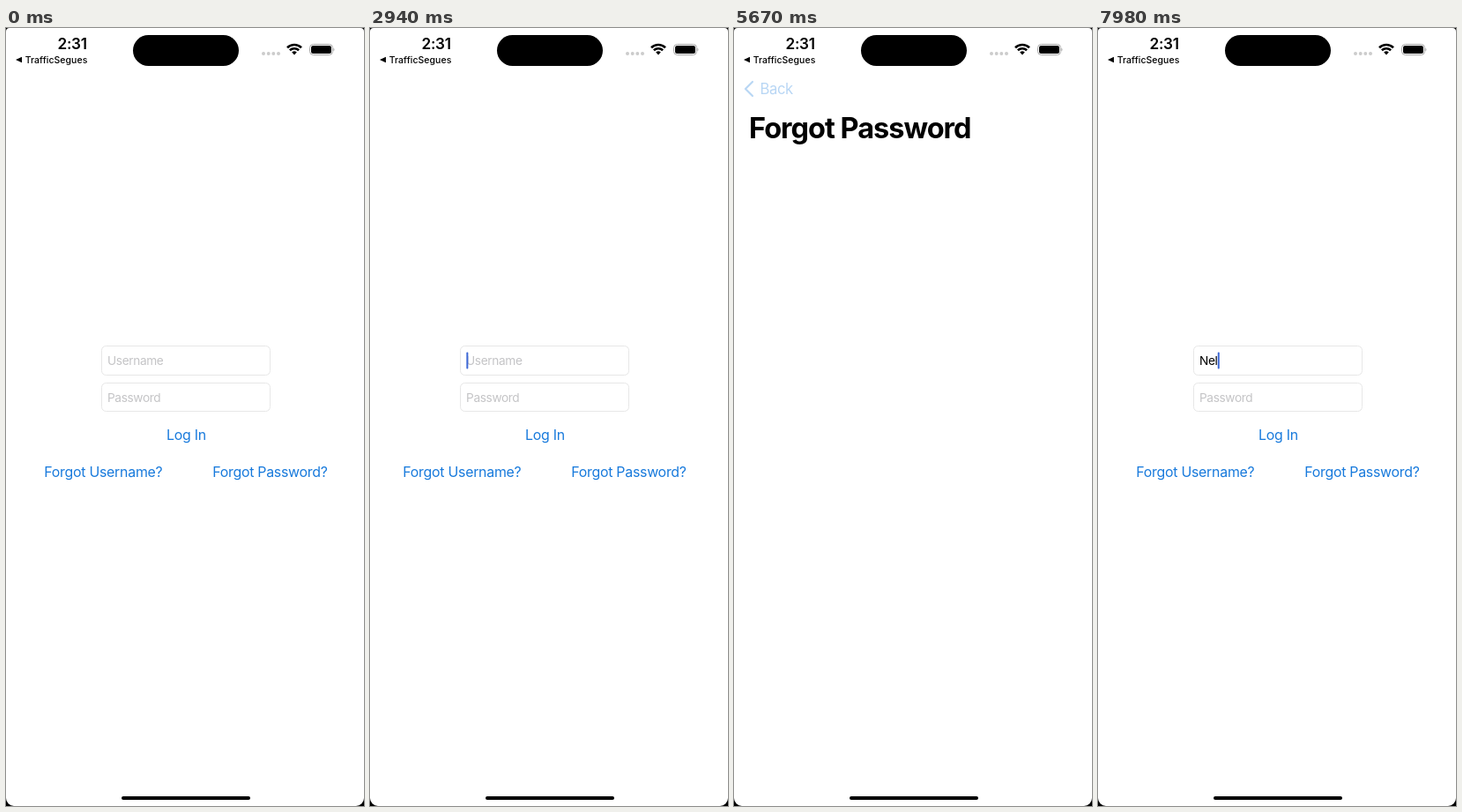
An HTML page that plays this animation: 406x882 px, repeating every 8 s.

```html
<!DOCTYPE html>
<html lang="en">
<head>
<meta charset="utf-8">
<title>Login flow</title>
<style>
  html, body { margin: 0; width: 100%; height: 100%; overflow: hidden; background: #fff; }
  svg { display: block; width: 406px; height: 882px; }
  text { font-family: Inter, "Open Sans", sans-serif; font-optical-sizing: none; white-space: pre; }
  .link { font-size: 15.9px; letter-spacing: -.26px; fill: #187adc; }
  .field rect { fill: #fff; stroke: #e7e7e7; }
  .field text { font-size: 13.7px; letter-spacing: -.38px; }
  .hint { fill: #c4c4c6; }
  .title { font-size: 32.5px; font-weight: 700; letter-spacing: -1px; }
  .back { font-size: 16.7px; letter-spacing: -.45px; fill: #187adc; }
  .clock { font-size: 17.2px; font-weight: 600; letter-spacing: -.3px; }
  .crumb { font-size: 10.5px; font-weight: 500; letter-spacing: .04px; }
</style>
</head>
<body>
<svg viewBox="0 0 406 882">
  <rect width="406" height="882" fill="#fff"/>

  <g id="home">
    <g class="field">
      <rect x="108.5" y="360.5" width="191" height="33" rx="5"/>
      <text id="userHint" class="hint" x="115" y="382">Username</text>
      <text id="typed" x="115" y="382"></text>
      <rect x="108.5" y="402.5" width="191" height="32" rx="5"/>
      <text class="hint" x="115" y="424">Password</text>
    </g>
    <rect id="caret" x="115.3" y="367.5" width="2" height="19" rx="1" fill="#3d68d6"/>
    <text class="link" x="182" y="466.7">Log In</text>
    <text id="forgotUser" class="link" x="43.3" y="509">Forgot Username?</text>
    <text id="forgotPass" class="link" x="234.2" y="509">Forgot Password?</text>
  </g>
  <rect id="dim" width="406" height="882"/>
  <rect id="page" width="406" height="882" fill="#fff"/>

  <g id="nav">
    <text id="title" class="title" x="17" y="124.5"></text>
    <g id="back">
      <path id="chevron" d="M21 61L13 69L21 77" fill="none" stroke="#187adc" stroke-width="2.2" stroke-linecap="round" stroke-linejoin="round"/>
      <text id="backText" class="back" x="29.5" y="75">Back</text>
    </g>
  </g>

  <g id="status">
    <text class="clock" x="58.5" y="24">2:31</text>
    <path d="M11 36L18 32.8V39.2Z"/>
    <text class="crumb" x="21.7" y="40">TrafficSegues</text>
    <rect x="144" y="8" width="120" height="35" rx="17.5"/>
    <g fill="#ccc">
      <circle cx="292" cy="29" r="2"/><circle cx="297.7" cy="29" r="2"/>
      <circle cx="303.3" cy="29" r="2"/><circle cx="309" cy="29" r="2"/>
    </g>
    <g fill="none" stroke="#000" stroke-width="2.6">
      <path d="M319 22.3A11.5 11.5 0 0 1 335 22.3"/>
      <path d="M321.9 25.3A7.3 7.3 0 0 1 332.1 25.3"/>
    </g>
    <path d="M327 30.5L324.2 27.6A4 4 0 0 1 329.8 27.6Z"/>
    <rect x="344.5" y="18.5" width="26" height="12" rx="4" fill="none" stroke="#a6a6a6"/>
    <rect x="346" y="20" width="23" height="9" rx="2.5"/>
    <path d="M371.5 22.5Q373.5 24.5 371.5 26.5Z" fill="#a6a6a6"/>
    <rect x="131" y="871" width="146" height="4" rx="2"/>
    <path d="M0 0H4A4 4 0 0 0 0 4ZM406 0H402A4 4 0 0 1 406 4ZM0 882H9A9 9 0 0 1 0 873ZM406 882H397A9 9 0 0 0 406 873Z"/>
  </g>
</svg>
<script>
const LOOP = 8000, STEP = 70, WIDTH = 406, PARALLAX = 0.3;
const el = Object.fromEntries([...document.querySelectorAll("[id]")].map(n => [n.id, n]));

const moves = [
  { at: 1136, push: true, title: "Forgot Username" },
  { at: 2669, push: false, title: "Forgot Username" },
  { at: 4286, push: true, title: "Forgot Password" },
  { at: 5803, push: false, title: "Forgot Password" }
];
const caretKeys = [
  [210, 0], [350, 1], [770, 1], [910, 0], [2668, 0], [2669, 1],
  [3290, 1], [3430, 0], [3570, 0], [3780, 1], [4285, 1], [4286, 0],
  [5802, 0], [5803, 1], [6650, 1], [6720, 0], [6860, 0], [7070, 1]
];
const word = "Nel", typeStart = 7560, typeGap = 210;

const clamp = v => Math.max(0, Math.min(1, v));
const within = (t, a, b) => t >= a && t < b;
const shift = (x, y = 0) => `translate(${x} ${y})`;

// Critically damped spring, settled at the end of the transition
function spring(ms, settle) {
  if (ms >= settle) return 1;
  const x = 0.0176 * ms;
  return 1 - (1 + x) * Math.exp(-x);
}

function keyed(keys, t) {
  const i = keys.findIndex(k => k[0] > t);
  if (i === 0) return keys[0][1];
  if (i < 0) return keys[keys.length - 1][1];
  const [t0, a] = keys[i - 1], [t1, b] = keys[i];
  return a + (b - a) * (t - t0) / (t1 - t0);
}

function drawPages(t) {
  const move = moves.filter(m => m.at <= t).pop();
  const s = move ? spring(t - move.at, move.push ? 470 : 620) : 0;
  const cover = !move ? 0 : move.push ? s : 1 - s;
  const away = 1 - cover;

  el.home.setAttribute("transform", shift(-WIDTH * PARALLAX * cover));
  el.dim.setAttribute("opacity", 0.118 * cover ** 3);
  el.page.setAttribute("x", WIDTH * away);
  el.nav.setAttribute("visibility", cover > 0 ? "visible" : "hidden");
  if (!cover) return;

  el.title.textContent = move.title;
  el.title.setAttribute("transform", shift(458 * away ** 1.056));
  el.title.setAttribute("opacity", move.push ? clamp(s * 1.5) : clamp(1 - s / 0.6));

  const pressed = within(t, 2520, 2669) || within(t, 5670, 5803);
  const slip = move.push ? clamp(away * 18) : 0;
  const fade = move.push ? clamp((s - 0.4) / 0.6) : 0.3 * clamp(1 - s / 0.4);
  el.back.setAttribute("opacity", pressed ? 0.3 : fade);
  el.backText.setAttribute("transform", shift(-1.2 * slip, 2.2 * slip));
  el.chevron.setAttribute("transform",
    `${shift(17 + 3.5 * slip, 69 + 2.5 * slip)} scale(${1 - 0.2 * slip}) ${shift(-17, -69)}`);
  el.chevron.setAttribute("opacity", 1 - 0.35 * slip);
}

function drawForm(t) {
  const count = t < typeStart ? 0 : Math.min(word.length, 1 + Math.floor((t - typeStart) / typeGap));
  el.typed.textContent = word.slice(0, count);
  el.userHint.setAttribute("visibility", count ? "hidden" : "inherit");
  el.caret.setAttribute("x", 115.3 + (count ? el.typed.getComputedTextLength() : 0));
  el.caret.setAttribute("opacity", keyed(caretKeys, t));
  el.forgotUser.setAttribute("opacity", within(t, 980, 1050) ? 0.35 : 1);
  el.forgotPass.setAttribute("opacity", within(t, 4130, 4200) ? 0.35 : 1);
}

const start = performance.now();
function tick() {
  const now = (performance.now() - start) % LOOP;
  const t = Math.floor((now + 8) / STEP) * STEP;
  drawPages(t);
  drawForm(t);
  requestAnimationFrame(tick);
}
tick();
</script>
</body>
</html>
```
